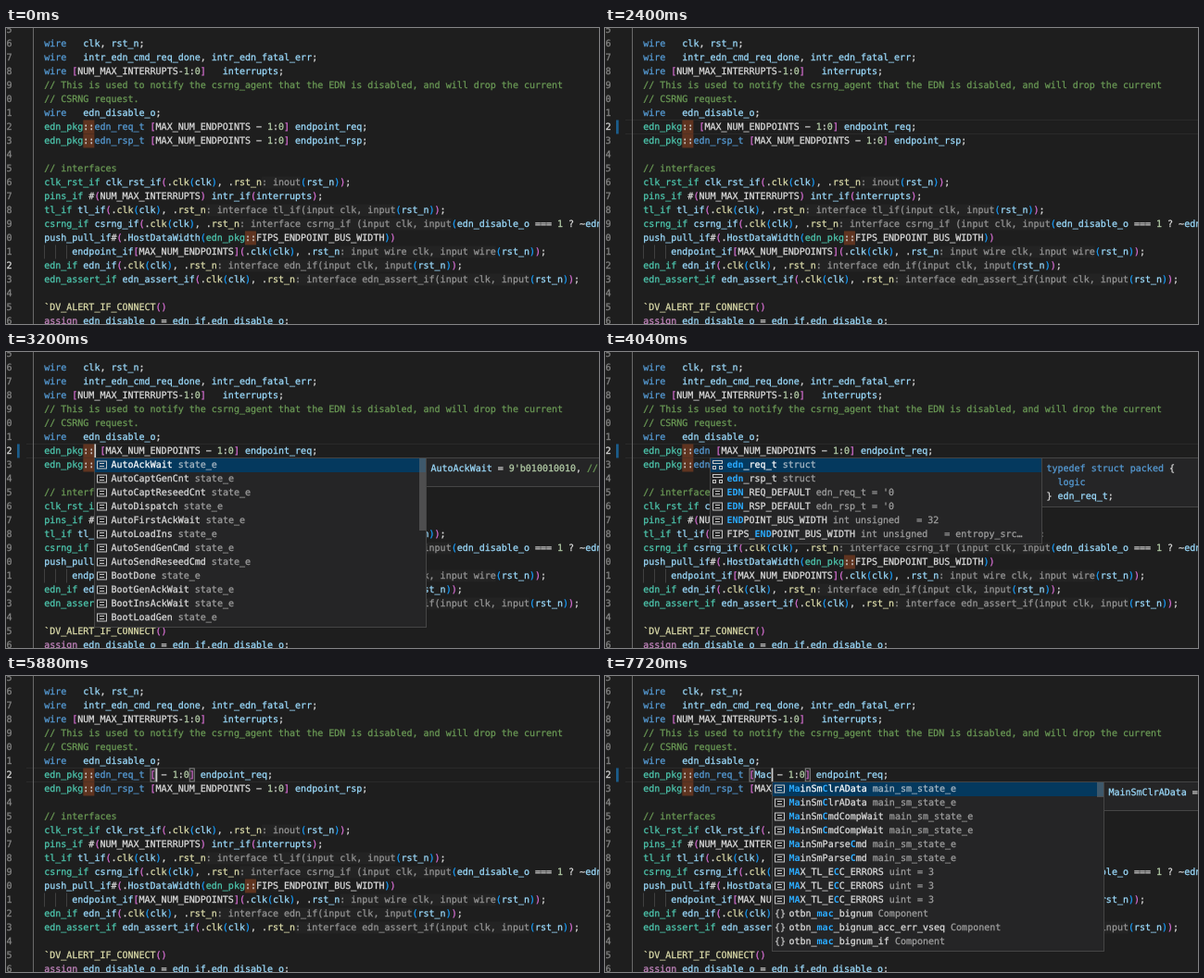
An HTML page with a canvas that plays this animation: 640x320 px, repeating every 8 s.

```html
<!DOCTYPE html>
<html>
<head>
<meta charset="utf-8">
<style>
  html, body { margin: 0; width: 100%; height: 100%; overflow: hidden; background: #1e1e1e; }
  canvas { display: block; }
</style>
</head>
<body>
<canvas id="stage" width="640" height="320"></canvas>
<script>
const ctx = document.getElementById('stage').getContext('2d');
const LOOP = 8000, BLINK = 480;
const CHAR = 6.02, LEFT = 41.2, ROW = 15, FIRST_LINE = 15, EDIT_LINE = 22;
const FONT = '10px "DejaVu Sans Mono", monospace';
const PLAIN = '#dcdcdc', VARIABLE = '#9cdcfe', TYPE = '#4ec9b0', KEYWORD = '#569cd6', CALL = '#dcdcaa';
const BRACKETS = ['#ffd700', '#da70d6', '#179fff'];
const KEYWORDS = /^(wire|typedef|struct|packed|logic)$/;
const INSTANCE = /^\w+ \w+\(/;

// Inlay hints are enclosed in « ».
const code = [
  '',
  'wire   clk, rst_n;',
  'wire   intr_edn_cmd_req_done, intr_edn_fatal_err;',
  'wire [NUM_MAX_INTERRUPTS-1:0]   interrupts;',
  '// This is used to notify the csrng_agent that the EDN is disabled, and will drop the current',
  '// CSRNG request.',
  'wire   edn_disable_o;',
  '',
  'edn_pkg::edn_rsp_t [MAX_NUM_ENDPOINTS − 1:0] endpoint_rsp;',
  '',
  '// interfaces',
  'clk_rst_if clk_rst_if(.clk(clk), .rst_n«: inout»(rst_n));',
  'pins_if #(NUM_MAX_INTERRUPTS) intr_if(interrupts);',
  'tl_if tl_if(.clk(clk), .rst_n«: interface tl_if(input clk, input»(rst_n));',
  'csrng_if csrng_if(.clk(clk), .rst_n«: interface csrng_if (input clk, input»(edn_disable_o === 1 ? ~edn_disable_o',
  'push_pull_if#(.HostDataWidth(edn_pkg::FIPS_ENDPOINT_BUS_WIDTH))',
  '     endpoint_if[MAX_NUM_ENDPOINTS](.clk(clk), .rst_n«: input wire clk, input wire»(rst_n));',
  'edn_if edn_if(.clk(clk), .rst_n«: interface edn_if(input clk, input»(rst_n));',
  'edn_assert_if edn_assert_if(.clk(clk), .rst_n«: interface edn_assert_if(input clk, input»(rst_n));',
  '',
  '`DV_ALERT_IF_CONNECT()',
  'assign edn_disable_o = edn_if.edn_disable_o;'
];

// Edited line over time: [time, text before caret, text after caret]
const PKG = 'edn_pkg', MAX = 'MAX_NUM_ENDPOINTS', END = ' − 1:0] endpoint_req;';
const RANGE = ` [${MAX}${END}`, OPEN = PKG + '::edn_req_t [';
const edits = [
  [0, PKG + '::edn_req_t', RANGE],
  [1920, PKG + '::', RANGE],
  [2640, PKG + ':', RANGE],
  [2760, PKG, RANGE],
  [2960, PKG + ':', RANGE],
  [3080, PKG + '::', RANGE],
  [3320, PKG + '::e', RANGE],
  [3440, PKG + '::ed', RANGE],
  [3560, PKG + '::edn', RANGE],
  [4120, PKG + '::edn_', RANGE],
  [4480, PKG + '::edn_r', RANGE],
  [4960, PKG + '::edn_req_t', RANGE],
  [5400, OPEN + MAX, END],
  [5720, OPEN, END],
  [6360, OPEN + 'M', END],
  [7080, OPEN + 'Ma', END],
  [7520, OPEN + 'Mac', END]
];
const caretResets = [...edits.slice(1).map(e => e[0]), 1200, 5880, 6600].sort((a, b) => a - b);

const items = (icon, detail, names) => names.split(' ').map(label => ({ icon, label, detail }));
const twice = names => names.split(' ').map(n => n + ' ' + n).join(' ');
const SM = 'main_sm_state_e';
const popups = [
  { from: 3120, to: 3320, thumb: 78, docs: ["AutoAckWait = 9'b010010010, // wait"],
    rows: items('enum', 'state_e', 'AutoAckWait AutoCaptGenCnt AutoCaptReseedCnt AutoDispatch AutoFirstAckWait ' +
      'AutoLoadIns AutoSendGenCmd AutoSendReseedCmd BootDone BootGenAckWait BootInsAckWait BootLoadGen') },
  { from: 3320, to: 4960, docs: ['typedef struct packed {', '  logic', '} edn_req_t;'],
    rows: [
      ...items('struct', 'struct', 'edn_req_t edn_rsp_t'),
      ...items('enum', "edn_req_t = '0", 'EDN_REQ_DEFAULT'),
      ...items('enum', "edn_rsp_t = '0", 'EDN_RSP_DEFAULT'),
      ...items('enum', 'int unsigned   = 32', 'ENDPOINT_BUS_WIDTH'),
      ...items('enum', 'int unsigned   = entropy_src…', 'FIPS_ENDPOINT_BUS_WIDTH')
    ] },
  { from: 6600, to: 7520, thumb: 15, docs: ["MainSmClrAData = 8'b01"],
    rows: items('enum', SM, twice('MainSmClrAData MainSmCmdCompWait MainSmError ' +
      'MainSmGeneratePrep MainSmGenerateReq MainSmIdle')) },
  { from: 7520, to: LOOP, thumb: 16, docs: ["MainSmClrAData = 8'b01"],
    rows: [
      ...items('enum', SM, twice('MainSmClrAData MainSmCmdCompWait MainSmParseCmd')),
      ...items('enum', 'uint = 3', 'MAX_TL_ECC_ERRORS MAX_TL_ECC_ERRORS MAX_TL_ECC_ERRORS'),
      ...items('braces', 'Component', 'otbn_mac_bignum otbn_mac_bignum_acc_err_vseq otbn_mac_bignum_if')
    ] }
];

const lineTop = n => 99.5 + (n - EDIT_LINE) * ROW;
const colX = col => LEFT + col * CHAR;

function rect(x, y, w, h, color) {
  ctx.fillStyle = color;
  ctx.fillRect(x, y, w, h);
}

function frame(x, y, w, h, color) {
  ctx.strokeStyle = color;
  ctx.lineWidth = 1;
  ctx.strokeRect(x, y, w, h);
}

// Each character sits on the monospace grid; a hairline outline adds a little weight.
function text(str, x, y, color, bold) {
  ctx.font = (bold ? 'bold ' : '') + FONT;
  ctx.fillStyle = ctx.strokeStyle = color;
  ctx.lineWidth = .25;
  [...str].forEach((ch, i) => {
    ctx.fillText(ch, x + i * CHAR, y + 10.5);
    if (!bold) ctx.strokeText(ch, x + i * CHAR, y + 10.5);
  });
}

function tokenColor(token, before, after, isDoc) {
  if (token.startsWith('//')) return '#6a9955';
  if (/^\d/.test(token)) return '#b5cea8';
  if (KEYWORDS.test(token)) return KEYWORD;
  if (token === 'assign') return '#c586c0';
  if (token[0] === '`') return CALL;
  if (!/^[a-z]/i.test(token) || /^[A-Z_]+$/.test(token)) return PLAIN;
  if (before.endsWith('::')) return KEYWORD;
  if (INSTANCE.test(before) && before.endsWith('.')) return CALL;
  if (after.startsWith('::') || (!before && !isDoc && after[0] !== '#')) return TYPE;
  return VARIABLE;
}

function codeLine(src, x, y, isDoc) {
  let depth = 1, marks = 0;
  for (const m of src.matchAll(/«[^»]*»|\/\/.*|::|\d+'b\d+|[\w`]+|\S/g)) {
    let token = m[0], color;
    const tx = x + (m.index - marks) * CHAR;
    if (token[0] === '«') {
      token = token.slice(1, -1);
      marks += 2;
      color = '#969696';
      rect(tx, y + 1, token.length * CHAR, 13, 'rgba(77,77,77,.1)');
    } else if (/^[([]$/.test(token)) {
      color = BRACKETS[depth++ % 3];
    } else if (/^[)\]]$/.test(token)) {
      color = BRACKETS[--depth % 3];
    } else {
      color = tokenColor(token, src.slice(0, m.index), src.slice(m.index + token.length), isDoc);
      if (token === '::') rect(tx, y, 2 * CHAR, ROW, '#5f3420');
    }
    text(token, tx, y, color);
  }
}

const icons = {
  enum(x, y) {
    frame(x + .5, y + 3.5, 10, 8, '#c5c5c5');
    rect(x + 3, y + 5.5, 5, 1, '#c5c5c5');
    rect(x + 3, y + 8.5, 5, 1, '#c5c5c5');
  },
  struct(x, y) {
    frame(x + .5, y + 3, 10, 3, '#c5c5c5');
    frame(x + .5, y + 9, 3, 3, '#c5c5c5');
    frame(x + 7.5, y + 9, 3, 3, '#c5c5c5');
  },
  braces(x, y) { text('{}', x, y, '#c5c5c5'); }
};

function panel(x, y, w, h) {
  rect(x, y, w, h, '#252526');
  frame(x + .5, y + .5, w - 1, h - 1, '#454545');
}

function popup({ rows, docs, thumb }, x, word) {
  const top = 114, width = 359;
  const match = word === 'Mac' ? /mac|^ma|(?<=^ma[^c]*)c/gi : word && new RegExp(word + '|end', 'i');
  panel(x + width - 1, top, 300, docs.length > 1 ? 54 : 32);
  docs.forEach((d, i) => codeLine(d, x + width + 4.5, top + 4.5 + i * ROW, true));
  panel(x, top, width, rows.length * ROW + 4);
  rect(x + 1, top + 1, width - 2, ROW, '#04395e');
  rows.forEach(({ icon, label, detail }, i) => {
    const y = top + .5 + i * ROW, labelX = x + 18.5;
    const hits = new Set();
    if (match) label.replace(match, (m, at) => { for (let k = 0; k < m.length; k++) hits.add(at + k); });
    icons[icon](x + 3, y);
    [...label].forEach((ch, k) =>
      text(ch, labelX + k * CHAR, y, hits.has(k) ? '#2aaaff' : i ? PLAIN : '#ffffff', hits.has(k)));
    text(detail, labelX + (label.length + 1) * CHAR, y, i ? '#9f9f9f' : '#a9b8c4');
  });
  if (thumb) rect(x + width - 8, top + 1, 7, thumb, 'rgba(121,121,121,.5)');
}

function select(line, from, to, color) {
  rect(colX(from), lineTop(line), (to - from) * CHAR, ROW, color);
}

function draw(t) {
  const [, before, after] = edits.findLast(e => e[0] <= t);
  const focused = t >= 1200, active = focused ? EDIT_LINE : 32;
  const top = lineTop(EDIT_LINE), caretX = colX(before.length);
  rect(0, 0, 640, 320, '#1e1e1e');

  if (focused) [99, 114].forEach(y => rect(22, y, 618, 1, '#2a2a2a'));
  rect(29, 0, 1, 320, '#6a6a6a');
  [41, 53, 65].forEach(x => rect(x, lineTop(31), 1, ROW, '#404040'));

  if (t >= 1480 && t < 1920) select(EDIT_LINE, 9, 18, '#264f78');
  if (t >= 5400 && t < 5720) select(EDIT_LINE, 20, 37, '#264f78');
  if (t >= 5520 && t < 5800) {
    select(23, 20, 37, 'rgba(173,214,255,.15)');
    select(31, 17, 34, 'rgba(173,214,255,.15)');
  }

  code.forEach((src, i) => {
    const n = FIRST_LINE + i, y = lineTop(n);
    text(String(n), 6.5 - 2 * CHAR, y, n === active ? '#e0e0e0' : '#858585');
    codeLine(n === EDIT_LINE ? before + after : src, LEFT, y);
  });

  if ((t >= 2120 && t < 5120) || t >= 6080) rect(12, top, 2.7, ROW, '#1b5d8c');
  if (t >= 5720) {
    [19, (before + after).indexOf(']')].forEach(c => frame(colX(c) + .5, top + .5, CHAR - 1, ROW - 1, '#888888'));
  }

  const reset = caretResets.findLast(r => r <= t);
  if (reset !== undefined && Math.floor((t - reset) / BLINK) % 2 === 0) {
    rect(caretX, top, 1.7, ROW, '#d0d0d0');
  }

  const open = popups.find(p => t >= p.from && t < p.to);
  if (open) popup(open, Math.round(caretX), before.match(/\w*$/)[0]);
}

ctx.textRendering = 'geometricPrecision';
function tick() {
  draw(performance.now() % LOOP);
  requestAnimationFrame(tick);
}
tick();
</script>
</body>
</html>
```
